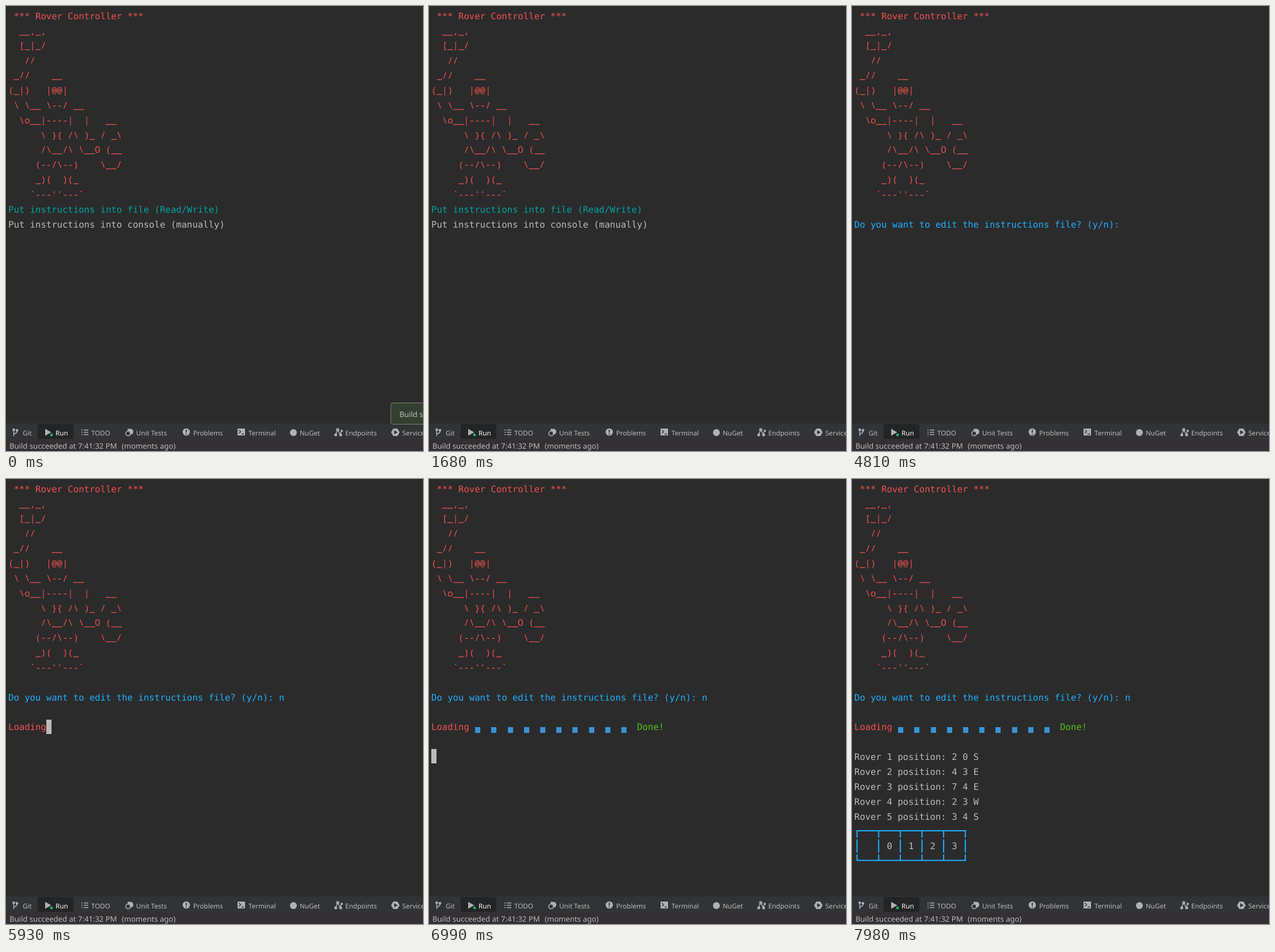
An HTML page that plays this animation: 724 by 773 pixels, repeating every 8000 ms.

```html
<!DOCTYPE html>
<html lang="en">
<head>
<meta charset="utf-8">
<title>Rover Controller</title>
<style>
  html, body { margin: 0; width: 100%; height: 100%; overflow: hidden; background: #2b2b2b; }
  svg { display: block; width: 724px; height: 773px; }
  text { white-space: pre; text-rendering: geometricPrecision; }
  #console text { font: 15.61px "DejaVu Sans Mono", monospace; font-variant-ligatures: none; }
  #console .art { font: 15.67px "Noto Sans Mono", monospace; }
  .ui { font: 11.6px "Noto Sans", "Open Sans", sans-serif; fill: #bbb; }
  .ui .big { font-size: 13.1px; }
  .line { fill: none; stroke: #afb1b3; stroke-width: 1.6; }
  .solid { fill: #afb1b3; }
</style>
</head>
<body>
<svg viewBox="0 0 724 773" xmlns="http://www.w3.org/2000/svg">
  <rect width="724" height="773" fill="#2b2b2b"/>
  <g id="console"></g>
  <rect id="caret" width="9" height="25" fill="#bbb"/>

  <g class="ui">
    <rect y="725" width="724" height="28" fill="#313335"/>
    <rect y="753" width="724" height="20" fill="#332f33"/>
    <rect x="55" y="726" width="62" height="26" fill="#232425"/>
    <g id="tabs"></g>
    <text class="big" x="6" y="769">Build succeeded at 7:41:32 PM</text>
    <text class="big" x="201" y="769">(moments ago)</text>

    <!-- branch, play, list -->
    <path class="line" d="M13.5 736V747M13.5 743Q19 743 19 738"/>
    <circle class="solid" cx="13.5" cy="736" r="2.3"/>
    <circle class="solid" cx="19" cy="737" r="2.3"/>
    <path class="solid" d="M68 734.5L78.5 740.5L68 746.5Z"/>
    <circle cx="79" cy="745" r="3" fill="#18b56a" stroke="#232425"/>
    <path class="line" d="M131 736.5h2M135 736.5h8M131 740.5h2M135 740.5h8M131 744.5h2M135 744.5h8"/>
    <!-- tests, problems, terminal -->
    <circle class="line" cx="212" cy="742.5" r="4"/>
    <path class="solid" d="M211 734.5h4a5 5 0 0 1 2 10l-1.5-1q2-5-4.5-6z"/>
    <circle class="solid" cx="313" cy="740" r="6.3"/>
    <path d="M313 736v5M313 742.5v2" stroke="#313335" stroke-width="1.8"/>
    <rect class="solid" x="402" y="734" width="13" height="12"/>
    <path d="M404.5 736.5l3 3-3 3M409 743.5h4" fill="none" stroke="#313335" stroke-width="1.4"/>
    <!-- packages, endpoints, services -->
    <circle class="solid" cx="499" cy="741" r="6"/>
    <path class="line" d="M572 745L576 736L580 744L583 738"/>
    <circle class="solid" cx="572.5" cy="745" r="2.5"/>
    <circle class="line" cx="576" cy="736" r="2"/>
    <circle class="solid" cx="581" cy="745" r="2.5"/>
    <circle class="solid" cx="583" cy="738" r="2"/>
    <path class="solid" d="M672.5 734h7l4 6.5-4 6.5h-7l-4-6.5z"/>
    <path d="M674 737l6 3.5-6 3.5z" fill="#313335"/>

    <g id="toast">
      <rect x="668" y="689.5" width="80" height="37" rx="4" fill="#343f30" stroke="#71896a"/>
      <text class="big" x="683" y="714">Build succeeded</text>
    </g>
  </g>

  <path id="mouse" d="M0 0V16L3.7 12.6L6.3 18.3L8.8 17.2L6.3 11.6H11.5Z" fill="#fff" stroke="#000"/>
</svg>
<script>
const LOOP = 8000, CELL = 9.4, ROW = 25.86, LEFT = 4, TOP = 4;
const RED = '#f0524f', CYAN = '#00a3a3', GRAY = '#bbb', SKY = '#1fb0ff', BLUE = '#3993d4', GREEN = '#4fc414';
const $ = id => document.getElementById(id);
const colX = col => LEFT + col * CELL;
const rowY = row => TOP + row * ROW;
const timed = [];

function add(parent, tag, attrs, text = '') {
  const el = document.createElementNS('http://www.w3.org/2000/svg', tag);
  for (const key in attrs) el.setAttribute(key, attrs[key]);
  el.textContent = text;
  parent.append(el);
  return el;
}

function during(el, from, to = LOOP) {
  timed.push({ el, from, to });
}

function print(text, row, col, fill, from = 0, to = LOOP) {
  const el = add($('console'), 'text', { x: colX(col), y: rowY(row) + 18.7, fill }, text);
  during(el, from, to);
  return el;
}

const robot = [
  "  __,_,",
  "  [_|_/",
  "   //",
  " _//    __",
  "(_|)   |@@|",
  " \\ \\__ \\--/ __",
  "  \\o__|----|  |   __",
  "      \\ }{ /\\ )_ / _\\",
  "      /\\__/\\ \\__O (__",
  "     (--/\\--)    \\__/",
  "     _)(  )(_",
  "    `---''---`"
];
print(' *** Rover Controller ***', 0, 0, RED);
robot.forEach((line, i) => print(line, i + 1, 0, RED).classList.add('art'));

print('Put instructions into file (Read/Write)', 13, 0, CYAN, 0, 3340);
print('Put instructions into console (manually)', 14, 0, GRAY, 0, 3340);
print('Do you want to edit the instructions file? (y/n):', 14, 0, SKY, 3340);
print('n', 14, 50, SKY, 5270);
print('Loading', 16, 0, RED, 5930);

const ticks = [6000, 6120, 6240, 6350, 6470, 6590, 6730, 6820, 6910, 6990];
ticks.forEach((time, i) => during(
  add($('console'), 'rect', { x: Math.round(colX(8 + 3 * i)) + 1, y: 431, width: 9, height: 10, fill: BLUE }), time));
print('Done!', 16, 38, GREEN, 6990);

['2 0 S', '4 3 E', '7 4 E', '2 3 W', '3 4 S'].forEach((place, i) =>
  print(`Rover ${i + 1} position: ${place}`, 18 + i, 0, GRAY, 7520 + 92 * i));

// Table header: two rules and six broken uprights.
let grid = 'M7.7 611H198.3M7.7 662.5H198.3';
for (let i = 0; i < 6; i++) grid += `M${colX(4 * i) + CELL / 2} 611V623m0 3V649m0 3V662.5`;
during(add($('console'), 'path', { d: grid, fill: 'none', stroke: SKY, 'stroke-width': 2 }), 7980);
for (let i = 0; i < 4; i++) print(String(i), 24, 6 + 4 * i, GRAY, 7980);

during($('toast'), 0, 1680);

const tabs = [['Git', 29], ['Run', 86], ['TODO', 148], ['Unit Tests', 226], ['Problems', 325],
  ['Terminal', 421], ['NuGet', 510], ['Endpoints', 589], ['Services', 688]];
for (const [name, x] of tabs)
  add($('tabs'), 'text', { x, y: 746, fill: name === 'Run' ? '#fff' : GRAY }, name);

// Steps: time, then position; a step without a position hides the part.
const caretSteps = [
  [3340, 50, 14], [3790], [4340, 50, 14], [4810], [5270, 51, 14], [5930, 7, 16],
  ...ticks.slice(0, -1).map((time, i) => [time, 10 + 3 * i, 16]),
  [6990, 0, 18], [7520]
];
const mouseSteps = [
  [520, 705, 748], [590, 660, 640], [660, 625, 555], [730, 600, 495], [800, 586, 455],
  [870, 572, 425], [940, 560, 403], [1010, 550, 391], [1080, 544, 385], [1150, 547, 388],
  [1280, 558, 399], [1350, 590, 450], [1430, 640, 540], [1510, 685, 630], [1600, 715, 690], [1680]
];

function place(el, steps, time, map) {
  const step = steps.findLast(s => s[0] <= time);
  const shown = step && step.length > 1;
  el.style.display = shown ? '' : 'none';
  if (shown) el.setAttribute('transform', `translate(${map(step[1], step[2])})`);
}

function render(time) {
  for (const { el, from, to } of timed)
    el.style.display = time >= from && time < to ? '' : 'none';
  place($('caret'), caretSteps, time, (col, row) => [Math.round(colX(col)), Math.round(rowY(row))]);
  place($('mouse'), mouseSteps, time, (x, y) => [x + 0.5, y + 0.5]);
}

function frame() {
  render(performance.now() % LOOP);
  requestAnimationFrame(frame);
}
frame();
</script>
</body>
</html>
```
